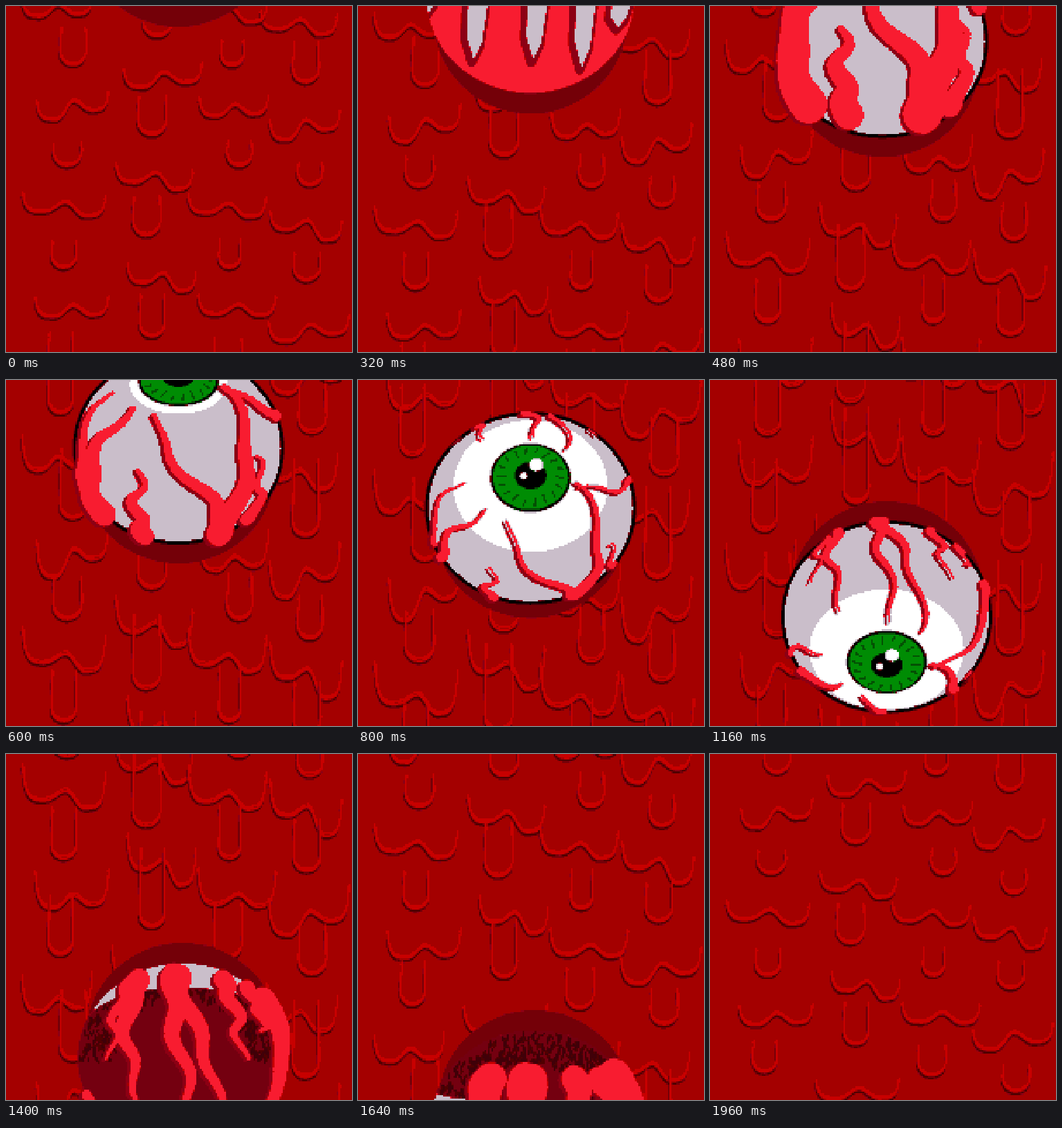
Animation, 500 px wide and 500 px high, one loop 2000 ms. Source, as an HTML page with a canvas:

```html
<!DOCTYPE html>
<html lang="en">
<head>
<meta charset="utf-8">
<title>Rolling eye</title>
<style>
html, body { margin: 0; width: 100%; height: 100%; overflow: hidden; background: #a40000; }
canvas { display: block; width: 100vw; height: 100vh; image-rendering: pixelated; }
</style>
</head>
<body>
<canvas id="stage" width="200" height="200"></canvas>
<script>
const ctx = document.getElementById('stage').getContext('2d', { willReadFrequently: true });
const RX = 150, RY = 137, LOOP = 2000, STEP = 40, TILE = 584, RAD = Math.PI / 180;
const C = {
  wall: '#a40000', light: '#c80000', dark: '#500000', shade: '#740008',
  sclera: '#cabeca', white: '#ffffff', black: '#000000', red: '#f81c30',
  deep: '#8c0014', green: '#008c04', moss: '#045004', gore: '#740010', pit: '#400008'
};
const palette = Object.values(C).map(c => [1, 3, 5].map(i => parseInt(c.substr(i, 2), 16)));

// Time tracks: [ms, value]
const eyeY = [[0, -137], [600, 98], [1160, 342], [1960, 667]];
const turn = [[0, -165], [600, -49], [1160, 31], [1960, 139]];
const flow = [[0, 0], [320, 30], [1960, 526]];

// Veins run from the back towards the iris: azimuth at base and tip, tip's angle from the iris, width
const veins = [
  [62, 8, 26, 36], [62, 119, 31, 28], [113, 114, 66, 27], [150, 145, 33, 34], [155, 185, 39, 20],
  [37, 37, 69, 18], [-20, 15, 28, 24], [-96, -82, 28, 26], [-92, -47, 29, 24],
  [-121, -127, 43, 24], [-128, -136, 72, 14], [-62, -52, 70, 20], [-41, -40, 90, 16]
];
// Openings in the red tissue behind the eye: centre and depth
const gaps = [[-153, 24], [-78, 87], [8, 86], [78, 98], [130, 40]];

const clamp = (v, lo, hi) => Math.max(lo, Math.min(hi, v));

function at(track, t) {
  const i = track.findIndex(k => k[0] > t);
  if (i < 0) return track[track.length - 1][1];
  const [t0, v0] = track[i - 1], [t1, v1] = track[i];
  return v0 + (v1 - v0) * (t - t0) / (t1 - t0);
}

function random(seed) {
  return () => (seed = seed * 16807 % 2147483647) / 2147483647;
}

function line(color, width) {
  ctx.strokeStyle = color;
  ctx.lineWidth = width;
  ctx.stroke();
}

function oval(x, y, rx, ry, color) {
  ctx.beginPath();
  ctx.ellipse(x, y, rx, ry, 0, 0, 7);
  ctx.fillStyle = color;
  ctx.fill();
}

// Four staggered columns, single and double drips by turns
function makeDrips() {
  const rnd = random(4242), list = [];
  [[85, 10], [215, 43], [330, 89], [432, 39]].forEach(([x, top], col) => {
    for (let row = 0; row < 8; row++) {
      const double = (row + (col % 3 ? 1 : 0)) % 2 === 0;
      list.push({
        double,
        x: x + (rnd() - .5) * 24,
        y: top + row * TILE / 8 + (rnd() - .5) * 12,
        w: double ? 94 + rnd() * 26 : 32 + rnd() * 10,
        h: double ? 26 : 30 + rnd() * 28,
        tilt: (rnd() - .5) * 30
      });
    }
  });
  return list;
}
const drips = makeDrips();

function dripPath({ double, x, y, w, h, tilt }, k) {
  const l = x - w / 2, r = x + w / 2, p = new Path2D();
  if (!double) {
    p.moveTo(l + 2, y - h * k);
    p.lineTo(l, y - w / 2);
    p.bezierCurveTo(l, y + w * .17, r, y + w * .17, r, y - w / 2);
    p.lineTo(r - 1, y - h * k);
    return p;
  }
  const a = y + tilt * k / 2, b = y - tilt * k / 2, mid = Math.min(a, b) - 14, u = f => l + w * f;
  p.moveTo(l, a - h * k);
  p.bezierCurveTo(l + 2, a, u(.12), a, u(.26), a);
  p.bezierCurveTo(u(.4), a, u(.42), mid, u(.52), mid);
  p.bezierCurveTo(u(.62), mid, u(.64), b, u(.76), b);
  p.bezierCurveTo(u(.9), b, r - 2, b, r, b - h * k);
  return p;
}

function drawDrips(t) {
  const k = 1 + 1.4 * Math.sin(Math.PI * t / LOOP) ** 2, dy = at(flow, t);
  const strokes = [[2, C.dark, 3.5], [-4 - k, C.light, 3], [-2, C.light, 3]];
  for (const shift of [dy, dy - TILE]) {
    for (const d of drips) {
      const path = dripPath(d, k);
      for (const [offset, color, width] of strokes) {
        ctx.save();
        ctx.translate(offset > 0 ? -1 : 0, shift + offset);
        ctx.strokeStyle = color;
        ctx.lineWidth = width;
        ctx.stroke(path);
        ctx.restore();
      }
    }
  }
}

// Turn a point of the unit sphere about the horizontal axis
function spin([x, y, z], deg) {
  const c = Math.cos(deg * RAD), s = Math.sin(deg * RAD);
  return [x, y * c + z * s, z * c - y * s];
}

// Points on the far side slide out to the rim
function project([x, y, z]) {
  const r = z < 0 ? Math.hypot(x, y) || 1 : 1;
  return [x / r * RX, y / r * RY, z];
}

function lift(px, py) {
  const x = px / RX, y = py / RY, r = Math.max(1, Math.hypot(x, y));
  return [x / r, y / r, Math.sqrt(Math.max(0, 1 - x * x - y * y))];
}

// Point at an angle and azimuth (degrees) around a pole turned by deg
function around(angle, azimuth, deg) {
  const s = Math.sin(angle * RAD), u = azimuth * RAD;
  return project(spin([s * Math.cos(u), s * Math.sin(u), Math.cos(angle * RAD)], deg));
}

function polygon(pts) {
  if (pts.every(p => p[2] < 0)) return false;
  ctx.beginPath();
  pts.forEach(p => ctx.lineTo(p[0], p[1]));
  ctx.closePath();
  return true;
}

function cap(size, deg, color) {
  const visible = polygon(Array.from({ length: 72 }, (_, i) => around(size, i * 5, deg)));
  ctx.fillStyle = color;
  if (visible) ctx.fill();
  return visible;
}

function drawIris(deg) {
  if (!cap(22.8, deg, C.black)) return;
  cap(21.2, deg, C.green);
  for (let i = 0; i < 18; i++) {
    const a = around(14 + i % 3, i * 20, deg), b = around(19, i * 20 + 3, deg);
    if (a[2] < 0 || b[2] < 0) continue;
    ctx.beginPath();
    ctx.moveTo(a[0], a[1]);
    ctx.lineTo(b[0], b[1]);
    line(C.moss, 3);
  }
  cap(8.8, deg, C.black);
  const [x, y, z] = around(0, 0, deg);
  if (z < .7) return;
  oval(x + 8, y - 15, 10, 9, C.white);
  oval(x - 10, y + 1, 5, 5, C.white);
}

function drawVeins(deg) {
  const n = 18, back = 125;
  const swell = Math.min(2, .4 + 1.8 * (1 - Math.cos(deg * RAD)));
  const strands = veins.map(([u0, u1, tip, width]) => Array.from({ length: n + 1 }, (_, i) => {
    const s = i / n, wave = 5 * Math.sin(s * 13 + u0) * Math.sqrt(s);
    return [...around(back + (tip - back) * s, u0 + (u1 - u0) * s * s + wave, deg), width * swell * (1 - .75 * s)];
  }));
  for (const [color, dx, dy] of [[C.deep, -5, 3], [C.red, 0, 0]]) {
    for (const pts of strands) {
      for (let i = 1; i <= n; i++) {
        const [x0, y0, z0] = pts[i - 1], [x1, y1, z1, width] = pts[i];
        if (z0 < -.1 || z1 < -.1) continue;
        ctx.beginPath();
        ctx.moveTo(x0 + dx, y0 + dy);
        ctx.lineTo(x1 + dx, y1 + dy);
        line(color, width);
      }
    }
  }
}

function drawTissue(deg) {
  oval(0, 0, RX, RY, C.red);
  ctx.save();
  ctx.clip();
  for (const [x, depth] of gaps) {
    const drop = [[-12, 5], [-14, depth * .6], [-4, depth], [8, depth * .7], [16, 5]];
    const pts = drop.map(([dx, y]) => project(spin(lift(x + dx, y), deg + 105)));
    if (!polygon(pts)) continue;
    ctx.save();
    ctx.translate(-3, 4);
    polygon(pts);
    line(C.deep, 13);
    ctx.restore();
    polygon(pts);
    ctx.fillStyle = C.sclera;
    ctx.fill();
  }
  ctx.restore();
}

// Dark hollow at the back with a ragged upper rim
function drawHollow(deg) {
  if (!cap(69, deg - 180, C.gore)) return;
  line(C.gore, 3);
  ctx.save();
  ctx.clip();
  const rnd = random(7);
  for (let i = 0; i < 520; i++) {
    const u = (180 + rnd() * 180) * RAD, r = .66 + rnd() * .34;
    const x = Math.cos(u) * r * RX, y = Math.sin(u) * r * RY;
    ctx.beginPath();
    ctx.moveTo(x, y);
    ctx.lineTo(x + 4 - rnd() * 8, y + 3 + rnd() * 7);
    line(C.pit, 3);
  }
  ctx.restore();
}

function drawEye(t) {
  const x = 249 + 6 * clamp((t - 800) / 360, 0, 1), y = at(eyeY, t), deg = at(turn, t);
  oval(x, y + clamp((250 - y) / 3, -30, 30), RX - 10, RY, C.shade);
  ctx.save();
  ctx.translate(x, y);
  if (t < 460) {
    drawTissue(deg);
  } else {
    oval(0, 0, RX, RY, C.sclera);
    if (t < 1300) line(C.black, 5);
    cap(28 + 20 * clamp((t - 600) / 200, 0, 1), deg, C.white);
    drawIris(deg);
    if (t > 1180) drawHollow(deg);
    drawVeins(deg);
  }
  ctx.restore();
}

// Snap every pixel to the palette for hard edges
function harden() {
  const img = ctx.getImageData(0, 0, 200, 200), d = img.data;
  for (let i = 0; i < d.length; i += 4) {
    let best = Infinity, pick;
    for (const c of palette) {
      const e = (d[i] - c[0]) ** 2 + (d[i + 1] - c[1]) ** 2 + (d[i + 2] - c[2]) ** 2;
      if (e < best) { best = e; pick = c; }
    }
    [d[i], d[i + 1], d[i + 2]] = pick;
  }
  ctx.putImageData(img, 0, 0);
}

function draw(t) {
  ctx.setTransform(.4, 0, 0, .4, 0, 0);
  ctx.lineCap = ctx.lineJoin = 'round';
  ctx.fillStyle = C.wall;
  ctx.fillRect(0, 0, 500, 500);
  drawDrips(t);
  drawEye(t);
  harden();
}

let start, last = -1;
function tick(now) {
  start ??= now;
  const t = Math.floor((now - start) % LOOP / STEP) * STEP;
  if (t !== last) draw(last = t);
  requestAnimationFrame(tick);
}
requestAnimationFrame(tick);
</script>
</body>
</html>
```
